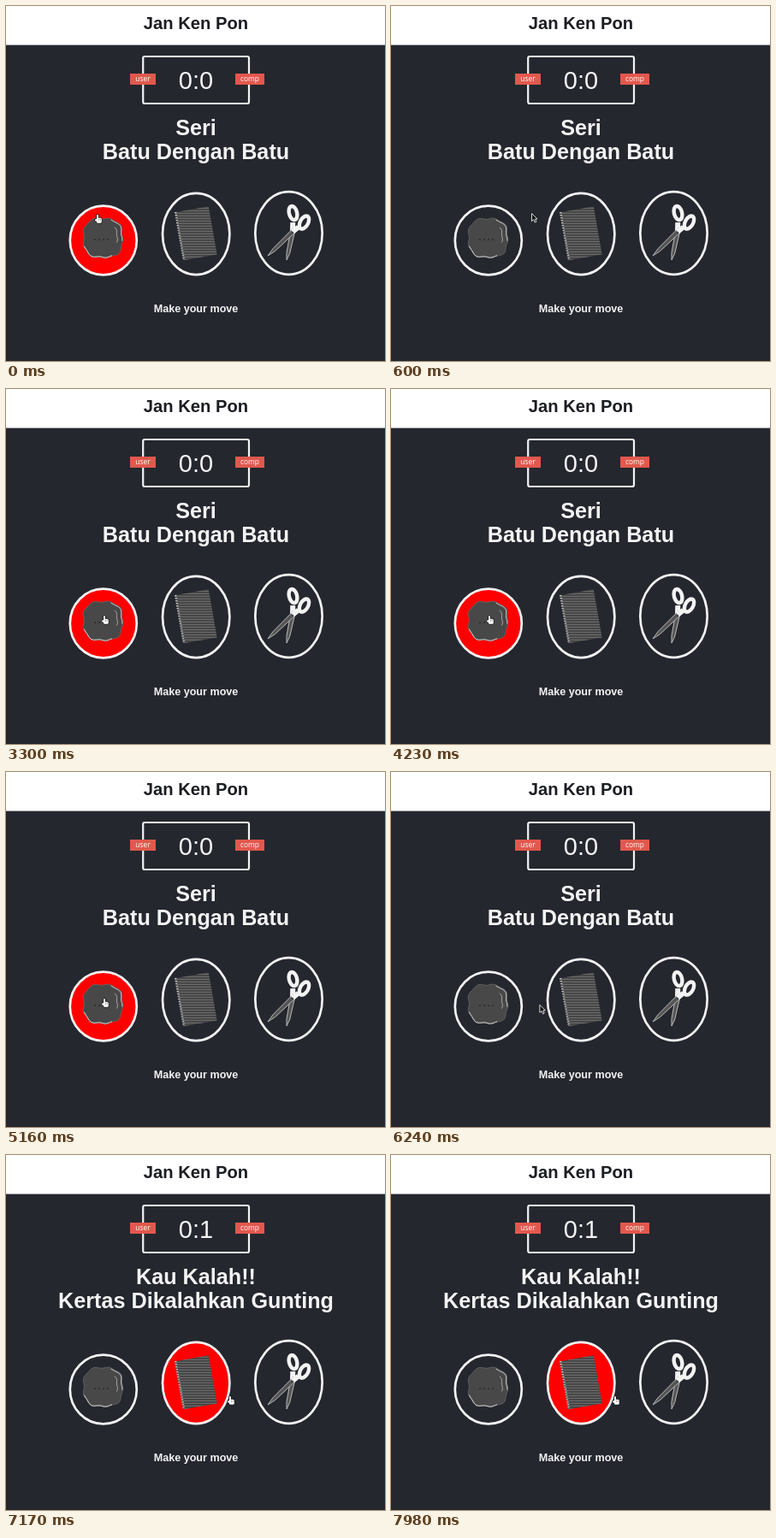
Animation, 443 px wide and 415 px high, one loop 8 s. Source, as an HTML page with a canvas:

```html
<!DOCTYPE html>
<html lang="id">
<head>
<meta charset="utf-8">
<title>Jan Ken Pon</title>
<style>
html, body { margin: 0; width: 100%; height: 100%; overflow: hidden; background: #24272e; }
canvas { display: block; width: 443px; height: 415px; }
</style>
</head>
<body>
<canvas id="stage"></canvas>
<script>
const W = 443, H = 415, MID = 222, LOOP = 8000, RESULT_AT = 7170;
const DARK = '#24272e', LIGHT = '#f3f3f3', GREY = '#484848', RED = '#ff0000', BADGE = '#e2584d';
const SANS = '"Liberation Sans", Arial, sans-serif', SMALL = '"Open Sans", sans-serif';
const canvas = document.getElementById('stage');
const ctx = canvas.getContext('2d');
const ratio = window.devicePixelRatio || 1;
canvas.width = W * ratio;
canvas.height = H * ratio;

const home = { x: 107, y: 244 };
const moves = [
  { from: 30, to: 480, x: 164, y: 242 },
  { from: 900, to: 1400, x: 115, y: 265 },
  { from: 6060, to: 6480, x: 262, y: 282 }
];

const choices = [
  { x: 113.8, y: 274, rx: 39, ry: 40.3, draw: drawRock },
  { x: 222.2, y: 266.5, rx: 39.2, ry: 47.6, draw: drawPaper },
  { x: 330.5, y: 265.5, rx: 39.2, ry: 48.4, draw: drawScissors }
];

function text(str, x, y, size, color = LIGHT, weight = 'bold', family = SANS) {
  ctx.font = `${weight} ${size}px ${family}`;
  ctx.textAlign = 'center';
  ctx.fillStyle = color;
  ctx.fillText(str, x, y);
}

function paint(fill, stroke, width = 1) {
  if (fill) { ctx.fillStyle = fill; ctx.fill(); }
  if (stroke) { ctx.strokeStyle = stroke; ctx.lineWidth = width; ctx.stroke(); }
}

function oval(x, y, rx, ry, angle, fill, stroke, width) {
  ctx.beginPath();
  ctx.ellipse(x, y, rx, ry, angle, 0, Math.PI * 2);
  paint(fill, stroke, width);
}

function at(x, y, angle, draw) {
  ctx.save();
  ctx.translate(x, y);
  ctx.rotate(angle);
  draw();
  ctx.restore();
}

function badge(label, x, w) {
  ctx.fillStyle = BADGE;
  ctx.fillRect(x, 79, w, 13);
  text(label, x + w / 2, 88.3, 8.4, '#fff', 'normal', SMALL);
}

// Lumpy outline between two angles
function rockEdge(from, to, scale = 1) {
  ctx.beginPath();
  for (let a = from; a < to; a += 0.12) {
    const r = scale * (24 - 1.3 * Math.cos(4 * a) + Math.cos(a + 2.25) + 0.8 * Math.sin(9 * a + 1));
    ctx.lineTo(r * Math.cos(a), r * Math.sin(a));
  }
}

function drawRock() {
  at(114, 272, 0, () => {
    rockEdge(0, Math.PI * 2);
    ctx.closePath();
    paint(GREY, '#6c6c6c', 0.7);
    rockEdge(1.1, 2.9, 0.98);
    paint(null, '#d4d4d4', 1);
    rockEdge(-1.2, 0.15, 0.96);
    paint(null, '#c4c4c4', 1);
    rockEdge(-0.8, 0.3, 0.72);
    paint(null, '#b0b0b0', 0.9);
    ctx.fillStyle = '#1c1c1c';
    for (let x = -11; x < 8; x += 5) ctx.fillRect(x, 0.5, 2, 1);
  });
}

function drawPaper() {
  const w = 40, h = 57, tilt = -Math.PI / 18;
  at(222, 265.8, tilt, () => {
    ctx.beginPath();
    ctx.rect(-w / 2, -h / 2, w, h);
    paint('#414141');
    ctx.save();
    ctx.clip();
    ctx.rotate(-tilt);
    ctx.fillStyle = '#7c7c7c';
    for (let y = -33; y < 33; y += 3) ctx.fillRect(-w, y, w * 2, 0.9);
    ctx.restore();
    ctx.fillStyle = '#c8c8c8';
    for (let y = -h / 2; y < h / 2; y += 3) ctx.fillRect(-w / 2 - 0.5, y, 2.5, 1.1);
  });
}

// Ring and tapered blade, joined near the pivot
function scissorHalf(ringX, ringY, ringAngle, tipX, tipY) {
  const x = 335, y = 264;
  const length = Math.hypot(tipX - x, tipY - y);
  at(x, y, Math.atan2(tipY - y, tipX - x), () => {
    ctx.beginPath();
    ctx.moveTo(-4, -2.6);
    ctx.lineTo(length * 0.75, -2);
    ctx.lineTo(length, 0);
    ctx.lineTo(length * 0.75, 1.8);
    ctx.lineTo(-4, 2.6);
    ctx.closePath();
    paint('#555', '#bdbdbd', 0.9);
  });
  ctx.beginPath();
  ctx.moveTo(x, y);
  ctx.lineTo((ringX + x) / 2, (ringY + y) / 2);
  paint(null, LIGHT, 6);
  oval(ringX, ringY, 4.6, 8.2, ringAngle, null, LIGHT, 4.4);
}

function drawScissors() {
  scissorHalf(335.5, 242, -0.25, 328, 297);
  scissorHalf(348.5, 253, 0.5, 306, 292);
  oval(335, 265, 1.2, 1.2, 0, '#444');
}

function drawArrow() {
  ctx.beginPath();
  ctx.moveTo(0.5, 0.5);
  ctx.lineTo(0.5, 9.5);
  ctx.lineTo(2.7, 7.7);
  ctx.lineTo(4.2, 11);
  ctx.lineTo(5.8, 10.2);
  ctx.lineTo(4.4, 7.1);
  ctx.lineTo(7, 7);
  ctx.closePath();
  paint('#111', '#eee', 0.9);
}

function drawHand() {
  ctx.beginPath();
  ctx.roundRect(-1, 0, 2, 7, 1);
  ctx.roundRect(-1.2, 3.8, 6, 6, 1.5);
  ctx.roundRect(-3, 5.2, 3, 2.4, 1);
  paint(null, '#161616', 1.4);
  paint('#fff');
  ctx.fillStyle = '#444';
  for (const x of [1.2, 2.9]) ctx.fillRect(x, 4.8, 0.5, 2);
}

function pointerAt(t) {
  let { x, y } = home;
  for (const m of moves) {
    const p = Math.min(1, Math.max(0, (t - m.from) / (m.to - m.from)));
    const e = p * p * (3 - 2 * p);
    x += (m.x - x) * e;
    y += (m.y - y) * e;
  }
  return { x, y };
}

function isOver(c, p) {
  return ((p.x - c.x) / (c.rx + 1.5)) ** 2 + ((p.y - c.y) / (c.ry + 1.5)) ** 2 < 1.1;
}

function render(t) {
  const lost = t >= RESULT_AT;
  const pointer = pointerAt(t);
  const target = choices.find(c => isOver(c, pointer));
  ctx.setTransform(ratio, 0, 0, ratio, 0, 0);
  ctx.fillStyle = DARK;
  ctx.fillRect(0, 0, W, H);
  ctx.fillStyle = '#fff';
  ctx.fillRect(0, 0, W, 45.6);
  text('Jan Ken Pon', MID, 27, 20.2, '#1b1d22');

  ctx.beginPath();
  ctx.roundRect(160.2, 59, 123.8, 55, 2);
  paint(null, LIGHT, 2.2);
  text(lost ? '0:1' : '0:0', MID, 97, 29, LIGHT, 'normal');
  badge('user', 145, 30);
  badge('comp', 268, 34);

  const result = lost ? ['Kau Kalah!!', 'Kertas Dikalahkan Gunting'] : ['Seri', 'Batu Dengan Batu'];
  result.forEach((str, i) => text(str, MID, 150.5 + i * 28.5, 25.2));

  for (const c of choices) {
    oval(c.x, c.y, c.rx, c.ry, 0, c === target && RED, LIGHT, 2.7);
    c.draw();
  }
  text('Make your move', MID, 358, 12.6);
  at(pointer.x, pointer.y, 0, target ? drawHand : drawArrow);
}

const start = performance.now();
function tick() {
  render((performance.now() - start) % LOOP);
  requestAnimationFrame(tick);
}
tick();
</script>
</body>
</html>
```
